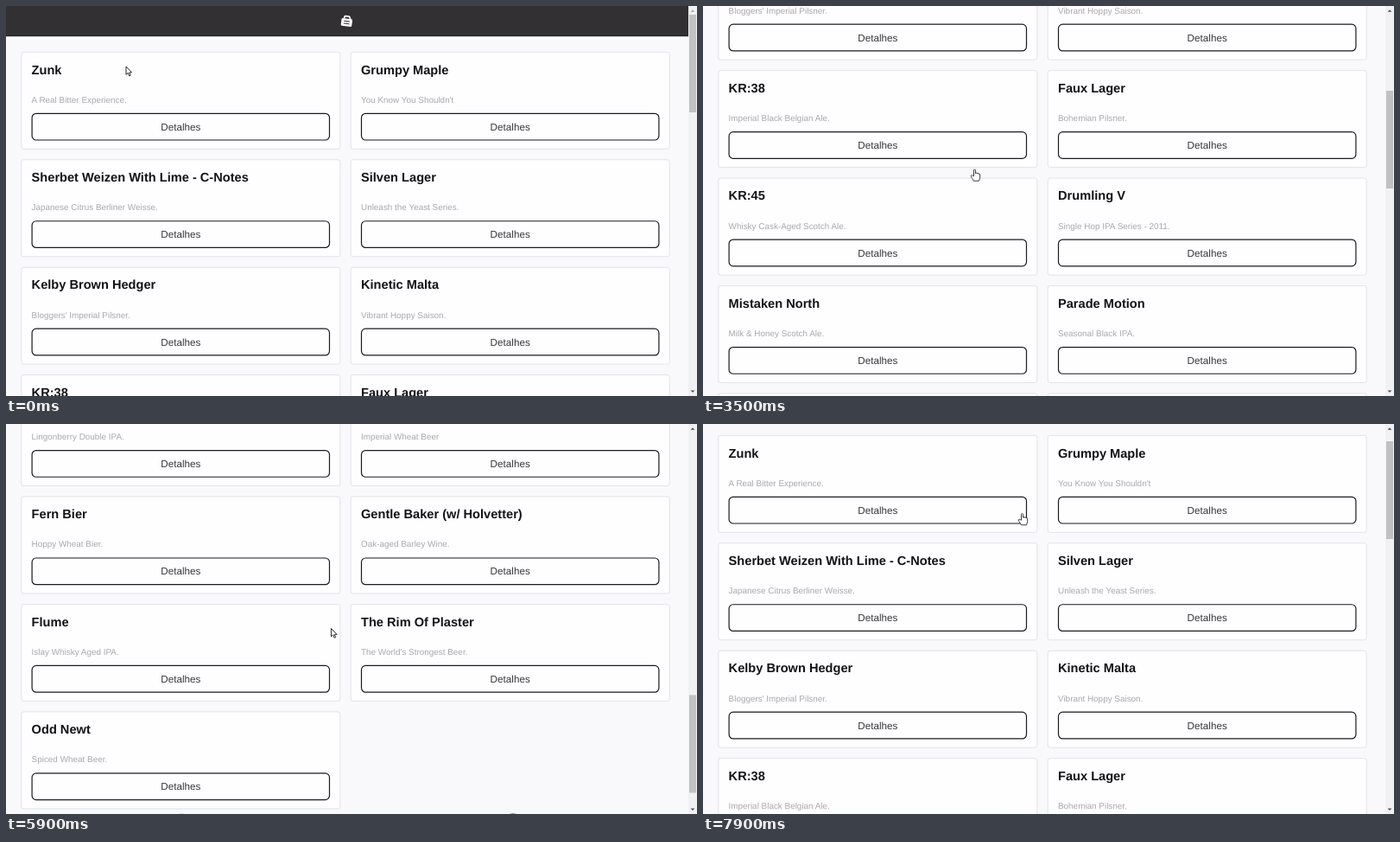
An HTML page for the animation above (8 s loop, 800x451 px).

```html
<!DOCTYPE html>
<html lang="pt">
<head>
<meta charset="utf-8">
<title>Cervejas</title>
<style>
html, body { margin: 0; width: 100%; height: 100%; overflow: hidden; background: #f9f8fb; }
svg { display: block; width: 100vw; height: 100vh; }
text { font-family: "Liberation Sans", Arial, sans-serif; text-rendering: geometricPrecision; }
.card { fill: #fefdff; stroke: #e4e2e7; }
.name { font-size: 14.61px; font-weight: 700; fill: #131215; }
.tag { font-size: 9.92px; fill: #a9a8ab; }
.btn { fill: #fefdff; stroke: #1b1a1d; stroke-width: 1.2; }
.btn.hover { fill: #f4f2f5; }
.label { font-size: 11.7px; fill: #38373b; text-anchor: middle; }
.nav { fill: none; stroke: #19181b; stroke-width: 1.15; }
.nav path { stroke-width: 2.8; }
.nav.off { stroke: #b9b8bb; }
.cursor { fill: #fff; stroke: #242326; stroke-width: .95; stroke-linejoin: round; }
</style>
</head>
<body>
<svg viewBox="0 0 800 451" preserveAspectRatio="none">
  <g id="page">
    <rect width="790" height="35" fill="#323033"/>
    <rect y="34.2" width="790" height="1" fill="#252326"/>
    <g id="mug">
      <rect x="-6" y="-6.3" width="8.8" height="12.6" rx="1.3" fill="#fff"/>
      <path d="M2.8 -3.4H4.4Q5.6 -3.4 5.6 -2.2V1.5Q5.6 2.3 4.9 2.7L2.8 3.7" fill="none" stroke="#fff" stroke-width="1.7"/>
      <path d="M-3 -3V3M-.2 -3V3" stroke="#323033" stroke-width="1.1" stroke-linecap="round"/>
    </g>
    <g id="cards"></g>
    <g class="nav off" transform="translate(203.5 1687.6)">
      <circle r="22.6"/><path d="M9.5 0H-8M0 -9.6L-9.4 0L0 9.6"/>
    </g>
    <g class="nav" transform="translate(587 1687.6)">
      <circle r="22.6"/><path d="M-9.5 0H8M0 -9.6L9.4 0L0 9.6"/>
    </g>
  </g>
  <rect x="790" width="10" height="451" fill="#f1f0f2"/>
  <rect id="thumb" x="791" width="8" height="113" fill="#c1c0c2"/>
  <path id="up" d="M792.6 6.8L795 4.2L797.4 6.8Z"/>
  <path id="down" d="M792.6 444.4L795 447L797.4 444.4Z"/>
  <path id="arrow" class="cursor" d="M0 0V9.4L2.2 7.4L3.7 10.9L5.2 10.2L3.7 6.9H6.6Z"/>
  <path id="hand" class="cursor" d="M-1.1 8.5V1.2A1.1 1.1 0 0 1 1.1 1.2V5.2A1 1 0 0 1 3.1 5.4A1 1 0 0 1 5.1 5.9A.9 .9 0 0 1 6.7 6.5V10C6.7 12 5.5 12.5 5.5 14.4H-1.4C-1.6 12.5 -4.6 10 -4.6 8.2C-4.4 6.8 -2.8 7.2 -1.1 8.5Z"/>
</svg>
<script>
const LOOP = 8000, STEP = 100, MAX_SCROLL = 1272;
const HOVERED = 20;

const beers = `Zunk|A Real Bitter Experience.
Grumpy Maple|You Know You Shouldn't
Sherbet Weizen With Lime - C-Notes|Japanese Citrus Berliner Weisse.
Silven Lager|Unleash the Yeast Series.
Kelby Brown Hedger|Bloggers' Imperial Pilsner.
Kinetic Malta|Vibrant Hoppy Saison.
KR:38|Imperial Black Belgian Ale.
Faux Lager|Bohemian Pilsner.
KR:45|Whisky Cask-Aged Scotch Ale.
Drumling V|Single Hop IPA Series - 2011.
Mistaken North|Milk & Honey Scotch Ale.
Parade Motion|Seasonal Black IPA.
Tallowmere|Toasted Winter Beer.
Gamma Fox|Malty Amber Red Ale.
Loopset 4|An Epic Fusion Of Old Belgian, American New Wave, And Scotch Whisky.
Elderline Porter|Dry-Hopped Aggressive Porter.
KR:91|Imperial Black IPA.
Bolivian Bell – India Pale Ale|Nesting Hop Bomb.
Today My Goat Is Hette-Dorit|Lingonberry Double IPA.
Hornifax|Imperial Wheat Beer
Fern Bier|Hoppy Wheat Bier.
Gentle Baker (w/ Holvetter)|Oak-aged Barley Wine.
Flume|Islay Whisky Aged IPA.
The Rim Of Plaster|The World's Strongest Beer.
Odd Newt|Spiced Wheat Beer.`.split("\n").map(line => line.split("|"));

// [time, value...] keys
const scrollKeys = [
  [2750, 0], [3100, 125], [3500, 352], [4400, 932], [4900, 1229], [5100, MAX_SCROLL],
  [5750, MAX_SCROLL], [6000, 1175], [6500, 861.5], [7300, 200], [7600, 40]
];
const cursorKeys = [
  [100, 139, 70], [800, 200, 92], [1700, 372, 150], [2400, 424.5, 177], [2900, 318, 186],
  [3500, 314.5, 189], [4400, 333.5, 199], [4900, 362, 214.5], [5800, 376, 236],
  [6500, 379.5, 239], [7200, 374, 160], [7900, 369.5, 103.5]
];

const $ = id => document.getElementById(id);
const move = (id, x, y, extra = "") => $(id).setAttribute("transform", `translate(${x} ${y})${extra}`);
const show = (id, on) => $(id).setAttribute("visibility", on ? "visible" : "hidden");
const escape = s => s.replace("&", "&amp;");

function card([name, tag], i) {
  const x = 17.5 + (i % 2) * 381.4, y = 53 + (i >> 1) * 124.45;
  return `<g transform="translate(${x} ${y})">
    <rect class="card" x=".3" y=".3" width="369" height="112" rx="2.5"/>
    <text class="name" x="12.1" y="25.6">${escape(name)}</text>
    <text class="tag" x="12.1" y="58.8">${escape(tag)}</text>
    <rect class="btn" x="12.6" y="71.3" width="344.4" height="30.7" rx="4.8"/>
    <text class="label" x="184.8" y="90.8">Detalhes</text>
  </g>`;
}

function sample(keys, t) {
  const next = keys.findIndex(k => k[0] > t);
  if (next === 0) return keys[0].slice(1);
  if (next < 0) return keys[keys.length - 1].slice(1);
  const a = keys[next - 1], b = keys[next];
  const p = (t - a[0]) / (b[0] - a[0]);
  return a.slice(1).map((v, i) => v + (b[i + 1] - v) * p);
}

$("cards").innerHTML = beers.map(card).join("");
const hoverBtn = document.querySelectorAll(".btn")[HOVERED];

function draw(t) {
  const [scroll] = sample(scrollKeys, t);
  const [x, y] = sample(cursorKeys, t);
  const pointing = (t >= 3000 && t < 4700) || t >= 6000;

  move("page", 0, -scroll);
  move("mug", 394.6, 17.4, ` rotate(${-82 + t * 0.036})`);
  $("thumb").setAttribute("y", 10 + scroll / 4);
  $("up").setAttribute("fill", scroll > 0 ? "#505050" : "#a8a7a9");
  $("down").setAttribute("fill", scroll < MAX_SCROLL ? "#505050" : "#a8a7a9");
  hoverBtn.classList.toggle("hover", t >= 4700 && t < 5100);
  move("arrow", x, y);
  move("hand", x, y, " scale(.92)");
  show("arrow", !pointing);
  show("hand", pointing);
}

const start = performance.now();
function tick(now) {
  const t = Math.max(0, now - start) % LOOP;
  draw(Math.floor(t / STEP) * STEP);
  requestAnimationFrame(tick);
}
draw(0);
requestAnimationFrame(tick);
</script>
</body>
</html>
```
